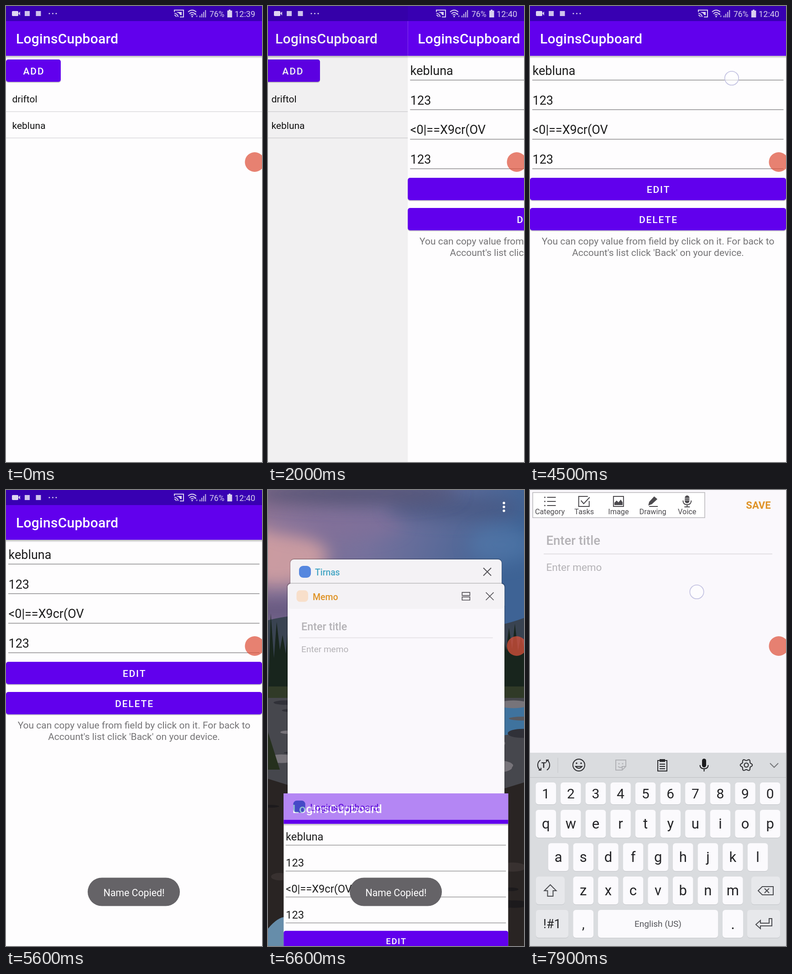
An HTML page that plays this animation: 561 px wide and 998 px high, repeating every 8 s.

```html
<!DOCTYPE html>
<html lang="en">
<head>
<meta charset="utf-8">
<style>
html, body { margin: 0; width: 100%; height: 100%; overflow: hidden; background: #fefdfe; }
svg { display: block; width: 100vw; height: 100vh; font-family: Roboto, "Noto Sans", sans-serif; }
.line { fill: none; stroke: currentColor; stroke-width: 2; }
</style>
</head>
<body>
<svg id="stage" viewBox="0 0 561 998" preserveAspectRatio="none"></svg>
<script>
const APP = 'LoginsCupboard', SITES = ['driftol', 'kebluna'];
const PURPLE = '#6100ed', ORANGE = '#df9327';

const text = (x, y, size, str, more = '') =>
  `<text x="${x}" y="${y}" font-size="${size}" ${more}>${str.replace(/</g, '&lt;')}</text>`;
const mid = (x, y, size, str, more = '') => text(x, y, size, str, 'text-anchor="middle" ' + more);
const rect = (x, y, w, h, fill, rx = 0, more = '') =>
  `<rect x="${x}" y="${y}" width="${w}" height="${h}" fill="${fill}" rx="${rx}" ${more}/>`;
const circle = (x, y, r, more = '') => `<circle cx="${x}" cy="${y}" r="${r}" ${more}/>`;
const path = (d, more = '') => `<path d="${d}" ${more}/>`;
const line = (d, more = '') => path(d, 'class="line" ' + more);
const group = (id, body, more = '') => `<g id="${id}" ${more}>${body}</g>`;
const at = (x, y, body, color = '#4c4a4e') => `<g transform="translate(${x} ${y})" color="${color}" fill="${color}">${body}</g>`;

// Login app
const bars = id => group(id, rect(0, 0, 561, 33, '#3800b2')) +
  rect(0, 109, 561, 3, '#0003') + rect(0, 112, 561, 2, '#0001') +
  rect(0, 33, 561, 76, PURPLE) +
  text(22, 82, 30, APP, 'fill="#fff" font-weight="500" letter-spacing=".25"');

const button = (y, w, label) => rect(0, y + 2, w, 49, '#0003', 5) + rect(0, y, w, 49, PURPLE, 5) +
  mid(w / 2 + 1, y + 33, 21, label, 'fill="#fff" font-weight="500" letter-spacing="1.9"');

const listPage = rect(0, 0, 561, 998, '#fefdfe') + bars('listBar') + button(117, 120, 'ADD') +
  SITES.map((s, i) => text(13.5, 211 + i * 57.5, 21, s, 'fill="#111"') +
    rect(0, 230.5 + i * 57.5, 561, 1.5, '#dcdbde')).join('') +
  rect(0, 0, 561, 998, '#000', 0, 'id="shade"');

const detailPage = rect(0, 33, 561, 965, '#fefdfe') + bars('detailBar') +
  [SITES[1], '123', '<0|==X9cr(OV', '123'].map((s, i) =>
    text(5.5, 151 + i * 64.7, 27, s, 'fill="#1d1d1d"') +
    rect(5, 161.5 + i * 64.7, 550.5, 1.3, '#7d7c7e')).join('') +
  button(376, 561, 'EDIT') + button(442, 561, 'DELETE') +
  mid(280.5, 522, 21, 'You can copy value from field by click on it. For back to', 'fill="#757476"') +
  mid(280.5, 546.5, 21, "Account's list click 'Back' on your device.", 'fill="#757476"') +
  group('appHead', rect(0, 33, 561, 66, '#f8f5fb') + rect(24, 51, 30, 30, '#2f86a8', 9) +
    text(66, 76, 23.4, APP, 'fill="#4b00c8"'));

// Status icons
const status = rect(13, 11, 14, 11, '#ded6f2', 2) + path('M27 16l4-4v9z') +
  rect(41, 11, 11, 11, '#cfc3ec') + rect(65.5, 11, 11, 11, '#cfc3ec') +
  [95, 102.5, 110].map(x => circle(x, 16.5, 1.5)).join('') +
  line('M369 13V9H389V24H381M369 16a8 8 0 0 1 8 8M369 20a4 4 0 0 1 4 4') + path('M374 13H385V20H382Q379 14 374 14z') +
  line('M399 13Q408 5 417 13M402 17Q408 11 414 17M405 20Q408 17 411 20') + circle(408, 23, 1.7) +
  path('M415 15l-2.5 4h5z', 'id="up"') + path('M418 25l-2.5-4h5z', 'id="down"') +
  [0, 1, 2, 3].map(i => rect(424 + i * 4, 21 - i * 4, 2.3, 4 + i * 4, '#b7a5e2')).join('') +
  text(446, 24, 17.5, '76%') + path('M485 10h3V8h4v2h3.5V25H485z') +
  text(501, 24, 18.2, '', 'id="clock"');

// Landscape behind the recent cards
let seed = 7;
const rnd = () => (seed = seed * 16807 % 2147483647) / 2147483647;
const trees = (x0, x1, base, top) => {
  let d = `M${x0} ${base}`;
  for (let x = x0; x < x1; x += 13) d += `L${x + 6} ${top + rnd() * 65}L${x + 13} ${top + 75 + rnd() * 25}`;
  return path(d + `L${x1} ${base}z`, 'fill="#18251d"');
};
const rocks = (n, y0, y1, colors) => Array.from({ length: n }, (_, i) =>
  `<ellipse cx="${rnd() * 561}" cy="${y0 + rnd() * (y1 - y0)}" rx="${12 + rnd() * 30}" ry="${3 + rnd() * 9}" fill="${colors[i % colors.length]}"/>`).join('');
const cloud = (x, y, rx, ry, c, o) => `<ellipse cx="${x}" cy="${y}" rx="${rx}" ry="${ry}" fill="${c}" opacity="${o}" filter="url(#soft)"/>`;
const wallpaper = rect(0, 0, 561, 340, 'url(#sky)') +
  cloud(20, 145, 110, 65, '#dba6a4', .8) + cloud(145, 75, 150, 32, '#82709a', .7) +
  cloud(410, 40, 150, 25, '#47557f', .7) + cloud(190, 8, 230, 26, '#50506f', .8) +
  cloud(510, 120, 70, 40, '#537cad', .6) + cloud(20, 265, 120, 22, '#594c73', .7) +
  path('M0 285Q120 255 280 290T561 280V460H0z', 'fill="#394351"') +
  trees(0, 250, 460, 270) + trees(340, 565, 460, 260) +
  rect(0, 430, 561, 30, '#303a27') + rect(0, 455, 561, 545, '#46474d') +
  path('M150 470H561V530Q400 560 250 520z', 'fill="#3f739e"') +
  rocks(45, 465, 625, ['#59595f', '#303138', '#77747a']) +
  path('M0 632L90 660 200 998H0zM561 640L480 665 360 998H561z', 'fill="#292423"') +
  rocks(24, 650, 970, ['#383130', '#1c1a1c']) +
  path('M0 530l26 82H0z', 'fill="#25301d"') + path('M0 960Q25 930 45 935V998H0z', 'fill="#668daa"');

// Cards and memo page
const cross = (x, y, r) => line(`M${x - r} ${y - r}l${2 * r} ${2 * r}m0 ${-2 * r}l${-2 * r} ${2 * r}`, 'color="#555358"');
const backCard = rect(48, 150, 465, 120, '#0003', 9) + rect(49, 152, 463, 120, '#f4f2f5', 8) + rect(68, 166, 26, 26, '#5687df', 9) +
  text(103, 187, 19.3, 'Tirnas', 'fill="#45a6c4" font-weight="500"') + cross(480.5, 179, 8.5);

const tools = [
  ['Category', line('M-6-9H13M-6 0H13M-6 9H13') + [-9, 0, 9].map(y => circle(-11, y, 1.5)).join('')],
  ['Tasks', line('M8-11H-12V11H11V-1M-7-2L-1 5 12-9')],
  ['Image', line('M-11-11H11V11H-11z') + path('M-9 8V3L-4-2 0 2 5-4 9 2V8z')],
  ['Drawing', path('M-10 9l2-8L3-11l7 6L-2 6z') + line('M-8 11H11')],
  ['Voice', rect(-5, -13, 10, 17, '#4c4a4e', 5) + line('M-9-2Q-9 7 0 7T9-2M0 7V12M-6 12H6') + path('M-5-7H5M-5-3H5', 'stroke="#fff"')]
];
const memo = rect(-2, -2, 565, 1000, '#0003', 9, 'id="memoShadow"') + rect(0, 0, 561, 1180, '#faf8fc', 9, 'id="memoBody"') +
  group('memoHead', rect(0, 0, 561, 65, '#f4f2f5', 9) + rect(23, 17, 30, 30, '#f8dfca', 9) +
    text(65, 42, 23, 'Memo', `fill="${ORANGE}" font-weight="500"`) +
    at(461.5, 32.5, line('M-10-10H10V-2H-10zM-10 2H10V10H-10z'), '#555358') + cross(523, 32.5, 10)) +
  group('tools', rect(6, 5.5, 377, 55, '#fff', 0, 'stroke="#b6b5b9" stroke-width="1.5"') +
    tools.map(([name, icon], i) => at(43.5 + i * 75.2, 25, icon) + mid(43.5 + i * 75.2, 53, 16.3, name, 'fill="#4c4a4e"')).join('') +
    mid(500.5, 41, 22, 'SAVE', `fill="${ORANGE}" font-weight="700"`)) +
  text(35.5, 120, 27.5, 'Enter title', 'fill="#b4b2b6" font-weight="500"') +
  rect(30, 139, 501, 1.8, '#e0dee2') + text(35.5, 177, 22.5, 'Enter memo', 'fill="#b4b2b6"');

// Keyboard
const key = (x, y, w, h, label, size = 31, fill = '#fbfafd') => rect(x, y + 1, w, h, '#c3c5c9', 6) + rect(x, y, w, h, fill, 6) +
  mid(x + w / 2, y + h / 2 + size * .35, size, label, 'fill="#232326"');
const keyRow = (x, y, h, chars, size) => [...chars].map((c, i) => key(x + i * 54.6, y, 44.5, h, c, size)).join('');
const GREY = '#e7e8eb';
const gear = Array.from({ length: 48 }, (_, i) => {
  const a = i * Math.PI / 24, r = 11.5 + 1.8 * Math.cos(6 * a);
  return (i ? 'L' : 'M') + (r * Math.cos(a)).toFixed(1) + ' ' + (r * Math.sin(a)).toFixed(1);
}).join('') + 'z';
const keyboard = rect(0, 575, 561, 423, '#dadcdf') + rect(0, 628.5, 561, 1.5, '#c6c8cb') + rect(60.5, 586, 1, 33, '#c4c6c9') +
  at(30, 602, line('M-7-11A13 13 0 0 0-7 11M-11 11H-6V6M7 11A13 13 0 0 0 7-11M11-11H6V-6') + mid(0, 6, 17, 'T', 'font-weight="700"'), '#2b2b2e') +
  at(107, 602, circle(0, 0, 13, 'class="line"') + circle(-5, -4, 1.8) + circle(5, -4, 1.8) + line('M-7 3Q0 11 7 3z'), '#2b2b2e') +
  at(199, 602, line('M-11-11H11V3L3 11H-11zM11 3H3V11M-6 3Q0 8 4 3') + circle(-4, -3, 1.5) + circle(4, -3, 1.5), '#b0b1b5') +
  at(290, 602, line('M-10-10H10V13H-10zM-5-12H5V-8H-5zM-6-2H6M-6 3H6M-6 8H6'), '#2b2b2e') +
  at(381.5, 602, rect(-4.5, -14, 9, 19, '#1b1b1d', 4.5) + line('M-9 0Q-9 8 0 8T9 0M0 8V14'), '#1b1b1d') +
  at(474, 602, line(gear) + circle(0, 0, 4.5, 'class="line"'), '#2b2b2e') +
  at(535, 602, line('M-9-4L0 5 9-4'), '#747579') +
  keyRow(12.5, 640, 48, '1234567890', 30) + keyRow(12.5, 700, 61, 'qwertyuiop') +
  keyRow(40, 773, 61, 'asdfghjkl') + keyRow(94.5, 846, 61, 'zxcvbnm') +
  key(13, 846, 63, 61, '', 31, GREY) + key(485, 846, 63, 61, '', 31, GREY) +
  key(13, 919, 71, 61, '!#1', 27, GREY) + key(94.5, 919, 44.5, 61, ',', 29) +
  key(149, 919, 263, 61, '', 19) + mid(280.5, 955.5, 19, 'English (US)', 'fill="#55555a"') +
  key(422, 919, 45, 61, '.', 33) + key(476, 919, 72, 61, '', 31, GREY) +
  at(44.5, 877, line('M0-13L13 0H6V12H-6V0H-13z'), '#4b4c50') +
  at(517, 877, line('M-17 0L-8-9H16V9H-8zM-3-5L7 5M7-5L-3 5'), '#4b4c50') +
  at(513, 949, line('M11-11H17V5H-8V11L-18 2-8-7V-1H11z'), '#4b4c50');

stage.innerHTML = `<defs>
  <linearGradient id="sky" x2="1" y2=".25"><stop stop-color="#8d7292"/><stop offset=".45" stop-color="#76719c"/><stop offset="1" stop-color="#3e6395"/></linearGradient>
  <filter id="soft" x="-50%" y="-100%" width="200%" height="300%"><feGaussianBlur stdDeviation="18"/></filter></defs>` +
  group('recents', wallpaper + group('menu', [28.5, 37, 45.5].map(y => circle(517, y, 2.7, 'fill="#fff"')).join('')) +
    group('backCard', backCard) + group('memo', memo)) +
  group('list', listPage) + group('detail', detailPage) + group('keyboard', keyboard) +
  group('status', status, 'fill="#d9d0ef" color="#d9d0ef"') +
  group('toast', rect(179, 848.5, 202, 62, '#656367', 31) + mid(280.5, 889, 21.3, 'Name Copied!', 'fill="#fff"')) +
  circle(545, 341.5, 21.5, 'fill="#e0533c" opacity=".72"') +
  circle(0, 0, 15.2, 'id="dot" fill="#fff" fill-opacity=".6" stroke="#c6c5e3" stroke-width="1.8"');

const el = id => document.getElementById(id);
const show = (id, on) => el(id).style.display = on ? '' : 'none';
const fade = (id, o) => { show(id, o > 0); el(id).setAttribute('opacity', Math.min(1, o)); };
const move = (id, x, y, s = 1) => el(id).setAttribute('transform', `translate(${x} ${y}) scale(${s})`);
const span = (t, a, b) => Math.max(0, Math.min(1, (t - a) / (b - a)));
const out = (u, n) => 1 - (1 - u) ** n;
const smooth = u => u * u * (3 - 2 * u);
const taps = [[1200, 1500, 397, 271], [4500, 4700, 442, 158], [7800, 8000, 365.5, 223]];

function draw(t) {
  // list -> detail
  const slide = t < 1900 ? 0 : out(span(t, 1850, 2400), 1.9);
  show('list', slide < 1);
  move('list', -13.4 * slide, 0);
  fade('shade', .11 * slide);

  // detail -> recent cards -> memo
  const recent = t >= 6300, p = out(span(t, 6250, 6600), 2), grow = smooth(span(t, 7100, 7580));
  show('recents', recent);
  show('status', !recent);
  show('detailBar', !recent);
  show('detail', slide > 0 && grow < .37);
  if (recent) {
    const s = 1 - .123 * p;
    move('detail', 34.3 * p, 664 * p - 33 * s + 1000 * grow, s);
  } else move('detail', 561 * (1 - slide), 0);
  fade('appHead', .55 * span(t, 6400, 6600) + .45 * span(t, 6600, 6800));

  const rise = 250 * (1 - p), left = 1 - grow;
  move('backCard', 0, rise);
  fade('backCard', p * (1 - 3 * grow));
  fade('menu', p * (1 - 2.4 * grow));
  move('memo', 43 * left, 205 * left + rise, 1 - .153 * left);
  fade('memo', p);
  fade('memoHead', 1 - 2.25 * grow);
  fade('tools', 3 * grow);
  show('memoShadow', !grow);
  el('memoBody').setAttribute('rx', grow ? 0 : 9);

  const up = out(span(t, 7500, 7800), 2);
  show('keyboard', up > 0);
  move('keyboard', 0, 423 * (1 - up));

  // overlays
  fade('toast', span(t, 4700, 5200) - span(t, 6900, 7200));
  const tap = taps.find(([a, b]) => t >= a && t < b);
  show('dot', tap);
  if (tap) move('dot', tap[2], tap[3]);
  el('clock').textContent = t < 600 ? '12:39' : '12:40';
  const beat = Math.floor((t + 400) / 1000) % 2;
  fade('up', beat ? .45 : 1);
  fade('down', beat ? 1 : .6);
}

// the screen refreshes ten times a second
(function tick(now) {
  draw(Math.floor(now % 8000 / 100) * 100);
  requestAnimationFrame(tick);
})(performance.now());
</script>
</body>
</html>
```
